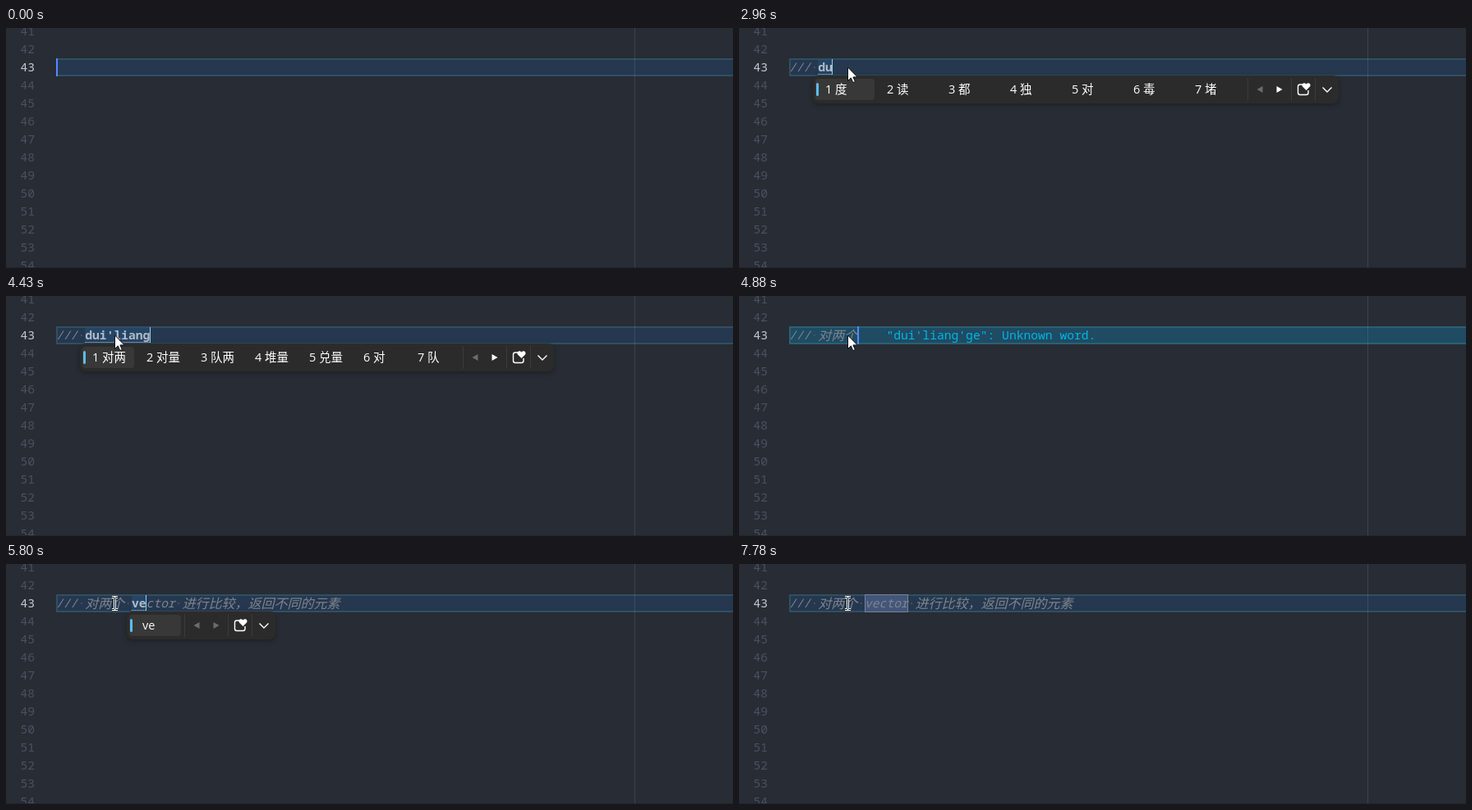
An HTML page for the animation above (8 s loop, 885 by 293 pixels).

```html
<!DOCTYPE html>
<html lang="zh-CN">
<head>
<meta charset="utf-8">
<title>Typing a comment</title>
<style>
  html, body { margin: 0; width: 100%; height: 100%; overflow: hidden; background: #282c34; }
  svg { display: block; }
  text { white-space: pre; }
  .mono { font: 14.667px "Noto Sans Mono", "DejaVu Sans Mono", monospace; }
  .han { font: 16px "Noto Sans CJK SC", "Noto Sans CJK", sans-serif; }
  .comment { fill: #7f848e; font-style: italic; }
  .comp { fill: #b4bac5; font-weight: 600; }
  .dot { fill: #4d5a6b; }
  .msg { fill: #00b7e4; }
  .num { fill: #495162; }
  .num.on { fill: #c3c8d2; }
  .cand { font: 14.5px "Open Sans", "Noto Sans CJK SC", "Noto Sans CJK", sans-serif; fill: #fff; }
  .popup { filter: drop-shadow(0 2px 3px rgba(0, 0, 0, .3)); }
</style>
</head>
<body>
<svg width="885" height="293" viewBox="0 0 885 293">
  <rect width="885" height="293" fill="#282c34"/>
  <g id="gutter"></g>
  <g id="line"></g>
  <rect x="765" width="1" height="293" fill="#abb2bf" opacity=".17"/>
  <rect y="292" width="885" height="1" fill="#22262f"/>
  <g id="popup"></g>
  <rect id="caret" y="37" width="2" height="22" fill="#528bff"/>
  <g id="mouse">
    <g id="beam" fill="none">
      <path d="M-3.5-7.5H-1L0-6.5 1-7.5H3.5M0-6.5V6.5M-3.5 7.5H-1L0 6.5 1 7.5H3.5" stroke="#fff" stroke-width="3"/>
      <path d="M-3.5-7.5H-1L0-6.5 1-7.5H3.5M0-6.5V6.5M-3.5 7.5H-1L0 6.5 1 7.5H3.5" stroke="#111"/>
    </g>
    <path id="arrow" d="M0 0V16.5L3.8 12.9 6.3 18.6 8.9 17.5 6.4 11.9H11.7Z" fill="#fff" stroke="#111"/>
  </g>
</svg>
<script>
const LOOP = 8000, LEFT = 61, CHAR = 8.8, HAN = 16;
const $ = id => document.getElementById(id);
const rect = (x, y, w, h, fill, more = '') =>
  `<rect x="${x}" y="${y}" width="${w}" height="${h}" fill="${fill}" ${more}/>`;
const text = (x, y, cls, s) => `<text x="${x}" y="${y}" class="${cls}">${s}</text>`;
const isHan = s => s.charCodeAt(0) > 0x2e80;
const widthOf = s => [...s].reduce((w, c) => w + (isHan(c) ? HAN : CHAR), 0);
const tail = ' 进行比较，返回不同的元素';

const typing = (comp, list, pitch = 66) => ({ comp, list: list.split(' '), pitch });
const word = (comp, pitch, ghost) => ({ comp, list: [comp], pitch, ghost: ghost + tail });
const commit = done => ({ done, comp: '', list: [] });

// Each step changes some fields of the state from its time on.
const steps = [
  [0, { done: '', comp: '', ghost: '', msg: '', list: [], pitch: 66, numbered: true,
        blink: false, arrow: false, mark: false }],
  [2160, { done: '/' }],
  [2290, { done: '//' }],
  [2430, { done: '///' }],
  [2710, { done: '/// ' }],
  [2790, { ...typing('d', '的 都 大 到 对 等 多', 75), arrow: true }],
  [2930, typing('du', '度 读 都 独 对 毒 堵', 75)],
  [3110, typing('dui', '对 队 堆 兑 怼 对于 队伍', 75)],
  [3640, { blink: true }],
  [3980, { ...typing("dui'l", '对了 队里 对啦 堆了 对立 对 队'), blink: false }],
  [4100, typing("dui'li", '对立 队里 堆里 兑礼 队礼 对 队')],
  [4200, typing("dui'lia", '对俩 队俩 堆俩 对 队 堆 兑')],
  [4290, typing("dui'lian", '对联 对脸 对练 队练 堆链 对 队')],
  [4380, typing("dui'liang", '对两 对量 队两 堆量 兑量 对 队')],
  [4500, typing("dui'liang'g", '对两个 队两个 对两 对量 队两 对 队', 80)],
  [4600, typing("dui'liang'ge", '对两个 队两个 对两 对量 队两 对 队', 80)],
  [4730, { msg: "dui'liang'ge" }],
  [4790, commit('/// 对两个')],
  [5060, { msg: '' }],
  [5590, { done: '/// 对两个 ', arrow: false }],
  [5650, { ghost: 'vector' + tail }],
  [5720, { ...word('v', 66, 'ector'), numbered: false }],
  [5800, word('ve', 66, 'ctor')],
  [5990, word('vec', 70, 'tor')],
  [6120, word('vect', 75, 'or')],
  [6340, word('vecto', 78, 'r')],
  [6480, { msg: 'vecto' }],
  [6600, { ...word('vector', 78, ''), numbered: true }],
  [6790, { msg: '' }],
  [6980, commit('/// 对两个 vector')],
  [7260, { mark: true }],
];

const fades = [
  [0, 1], [550, .66], [610, .33], [670, 0], [980, .5], [1040, 1],
  [1660, .75], [1720, .35], [1780, 0], [2030, .5], [2090, 1],
  [7630, .7], [7700, .3], [7780, 0],
];

const countAt = (table, t) => table.filter(([at]) => at <= t).length;

// Draws a string in runs of Latin and Han letters, with dots for spaces.
function run(x, s, cls) {
  let out = '';
  for (const part of s.match(/ |[\u2e80-\uffff]+|[^ \u2e80-\uffff]+/g) || []) {
    if (part === ' ') out += text(x, 53, 'mono dot', '·');
    else if (isHan(part)) out += text(x, 54, 'han ' + cls, part);
    else out += text(x, 53, 'mono ' + cls, part);
    x += widthOf(part);
  }
  return out;
}

function drawLine(s) {
  const start = LEFT + widthOf(s.done);
  const caret = start + widthOf(s.comp);
  const end = caret + widthOf(s.ghost);
  let out = rect(LEFT, 37, 900, 22, s.msg ? '#1f4b63' : '#25384f') +
    rect(LEFT + 1, 38, 900, 20, 'none', `stroke="${s.msg ? '#2a6076' : '#304f62'}" stroke-width="2"`);
  if (s.mark) out += rect(153.5, 37.5, 52, 21, '#43567a', 'stroke="#74849b"');
  if (s.comp) out += rect(start, 39, caret - start, 18, '#264f78', 'opacity=".6"');
  out += run(LEFT, s.done, 'comment') + run(start, s.comp, 'comp') + run(caret, s.ghost, 'comment');
  if (s.comp) {
    out += `<path d="M${start} 56.5H${caret}" stroke="#c3c8d2" stroke-dasharray="1 1"/>`;
    if (!s.blink) out += rect(Math.floor(caret), 38, 1, 19, '#8fd0f5');
  }
  if (s.msg) out += text(end + 4 * CHAR, 53, 'mono msg', `"${s.msg}": Unknown word.`);
  return out;
}

function drawPopup({ done, list, pitch, numbered }) {
  if (!list.length) return '';
  const x = Math.round(LEFT + widthOf(done) - 6.4);
  const width = list.length * pitch + 115, right = x + width;
  const many = list.length > 1;
  let out = rect(x, 58, width, 34, '#2b2b2b', 'rx="7" class="popup"') +
    rect(x + 3, 62, pitch - 3, 26, '#383838', 'rx="4"') +
    rect(x + 4, 67, 3, 16, '#5cbcea', 'rx="1.5"');
  list.forEach((c, i) => {
    out += text(x + (numbered ? 15 : 19) + i * pitch, 80, 'cand', numbered ? `${i + 1} ${c}` : c);
  });
  for (const d of [111, 58, 29]) out += rect(right - d, 61, 1, 28, '#3b3b3b');
  return out + `<g transform="translate(${right} 75)">
    <path d="M-92.5-4V4L-99.5 0Z" fill="#6c6c6c"/>
    <path d="M-75.5-4V4L-68.5 0Z" fill="${many ? '#fff' : '#6c6c6c'}"/>
    <path d="M-43-6H-47Q-49.500-6-49.500-3.500V4Q-49.500 6.500-47 6.500H-39.500Q-37 6.500-37 4V1" fill="none" stroke="#fff" stroke-width="1.4"/>
    <path d="M-39.500 1L-44-3.500C-46-6-42.500-9.500-39.500-6.500C-36.500-9.500-33-6-35-3.500Z" fill="#fff"/>
    <path d="M-19.500-2.500L-14 3-8.500-2.500" fill="none" stroke="#fff" stroke-width="1.4"/>
  </g>`;
}

function mouseAt(t) {
  if (t >= 1040) return [132.5, 48];
  if (t >= 980) return [136, 46];
  const p = Math.min(1, Math.floor((t - 70) / 60) / 9);
  const left = (1 - p) ** 2;
  return [139 + 517 * left, 51 + 186 * left];
}

let shown = 0;
function draw(t) {
  const count = countAt(steps, t);
  const s = Object.assign({}, ...steps.slice(0, count).map(step => step[1]));
  if (count !== shown) {
    shown = count;
    $('line').innerHTML = drawLine(s);
    $('popup').innerHTML = drawPopup(s);
  }
  $('caret').setAttribute('x', Math.floor(LEFT + widthOf(s.done)));
  $('caret').setAttribute('opacity', s.comp ? 0 : fades[countAt(fades, t) - 1][1]);
  const [x, y] = mouseAt(t);
  $('mouse').setAttribute('transform', `translate(${x} ${y})`);
  $('mouse').setAttribute('opacity', t < 70 ? 0 : 1);
  $('beam').setAttribute('opacity', s.arrow ? 0 : 1);
  $('arrow').setAttribute('opacity', s.arrow ? 1 : 0);
}

for (let n = 41; n <= 54; n++) {
  $('gutter').innerHTML += text(17.4, 53 + (n - 43) * 22, n === 43 ? 'mono num on' : 'mono num', n);
}

const begin = performance.now();
function tick() {
  draw((performance.now() - begin) % LOOP);
  requestAnimationFrame(tick);
}
tick();
</script>
</body>
</html>
```
